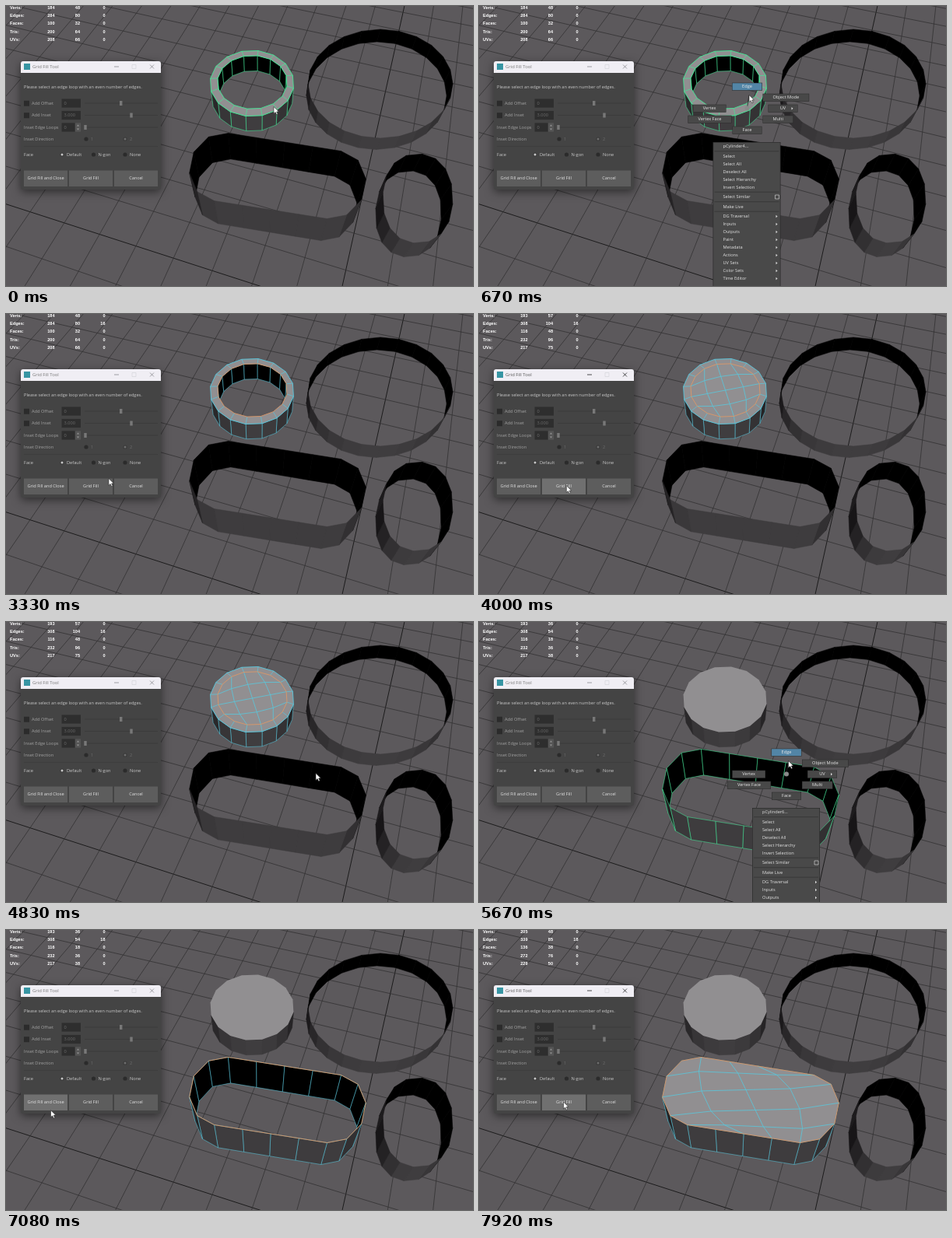
These frames come from a looping animation (600x360 px, 8 s). An HTML page with a canvas:

```html
<!DOCTYPE html>
<html lang="en">
<head>
<meta charset="utf-8">
<title>Grid Fill Tool</title>
<style>
html, body { margin: 0; width: 100%; height: 100%; overflow: hidden; background: #5c595c; }
canvas { display: block; }
</style>
</head>
<body>
<canvas id="stage" width="600" height="360"></canvas>
<script>
const ctx = document.getElementById('stage').getContext('2d');
const LOOP = 8000;
const GREEN = '#43e896', BLUE = '#58c8de', ORANGE = '#dc9868', FLOOR = '#5c595c';
const UI_FONT = '5.65px "Open Sans", sans-serif';

// ---------- timeline ----------
const T = {
  menu1: [80, 830], ringEdges: 920, ringPick: 1750, ringLoop: 1920, ringFill: 3750,
  select2: 5000, menu2: [5250, 6080], slotPick: 6330, slotLoop: 6500, slotFill: 7750
};
const within = (t, [a, b]) => t >= a && t < b;
const mix = (a, b, p) => a + (b - a) * p;
const mixPoint = (a, b, p) => [mix(a[0], b[0], p), mix(a[1], b[1], p)];

const menuCenter1 = [344.5, 131], menuCenter2 = [395, 195];
const edgeItem = ([x, y]) => [x + 2.5, y - 16.5];
const fillButton = [108.5, 221];
const cursorMoves = [
  { from: 300, to: 600, at: edgeItem(menuCenter1) },
  { from: 1170, to: 1420, at: [338, 127] },
  { from: 2000, to: 2500, at: [149, 204.5] },
  { from: 3170, to: 3530, at: fillButton },
  { from: 3950, to: 4700, at: [398, 194.5] },
  { from: 5300, to: 5640, at: edgeItem(menuCenter2) },
  { from: 6520, to: 6980, at: [57.5, 231.8] },
  { from: 7250, to: 7640, at: fillButton }
];
function cursorAt(t) {
  return cursorMoves.reduce((pos, { from, to, at }) => {
    const p = Math.min(1, Math.max(0, (t - from) / (to - from)));
    return mixPoint(pos, at, p * p * (3 - 2 * p));
  }, [344, 129.5]);
}

// ---------- drawing helpers ----------
function path(points, closed) {
  points.forEach(([x, y], i) => i ? ctx.lineTo(x, y) : ctx.moveTo(x, y));
  if (closed) ctx.closePath();
}
function fill(points, color) {
  ctx.beginPath(); path(points, true);
  ctx.fillStyle = color; ctx.fill();
}
function line(points, color, width = 0.8, closed = false) {
  ctx.beginPath(); path(points, closed);
  ctx.strokeStyle = color; ctx.lineWidth = width; ctx.stroke();
}
function rect(x, y, w, h, color) {
  ctx.fillStyle = color; ctx.fillRect(x, y, w, h);
}
function box(x, y, size, color) {
  ctx.strokeStyle = color; ctx.lineWidth = 0.7; ctx.strokeRect(x, y, size, size);
}
function dot(x, y, r, color) {
  ctx.beginPath(); ctx.arc(x, y, r, 0, 7);
  ctx.fillStyle = color; ctx.fill();
}
function text(str, x, y, color, align = 'left', font = UI_FONT) {
  ctx.font = font; ctx.textAlign = align; ctx.textBaseline = 'middle';
  ctx.fillStyle = color; ctx.fillText(str, x, y);
}

// ---------- scene geometry ----------
const NADIR = [325, 590], HORIZON = -650;
const range = n => Array.from({ length: n }, (_, i) => i);

// Ring of points; power below 1 makes it squarer.
function ellipse(cx, cy, rx, ry, n, phase = 0, power = 1) {
  const shape = v => Math.sign(v) * Math.abs(v) ** power;
  return range(n).map(k => {
    const a = phase + k * 2 * Math.PI / n;
    return [cx + rx * shape(Math.cos(a)), cy + ry * shape(Math.sin(a))];
  });
}
// Two five-sided caps joined by straight sides of four segments, clockwise.
function stadium(left, right, up, out) {
  const cap = (c, sign) => range(6).map(k => {
    const a = k * Math.PI / 5, u = sign * Math.cos(a), o = sign * Math.sin(a);
    return [c[0] + up[0] * u + out[0] * o, c[1] + up[1] * u + out[1] * o];
  });
  const side = (a, b) => [1, 2, 3].map(k => mixPoint(a, b, k / 4));
  const r = cap(right, 1), l = cap(left, -1);
  return [...r, ...side(r[5], l[0]), ...l, ...side(l[5], r[0])];
}
// Walls run down toward the vertical vanishing point.
function walls(rim, height) {
  const low = rim.map(p => mixPoint(p, NADIR, height * (p[1] - HORIZON)));
  return rim.map((p, i) => {
    const j = (i + 1) % rim.length, q = low[i];
    const dx = rim[j][0] - p[0], dy = rim[j][1] - p[1];
    const front = dx * (q[1] - p[1]) - dy * (q[0] - p[0]) < 0;
    const lum = Math.round(20 + 43 * Math.abs(dx) / Math.hypot(dx, dy));
    return { quad: [p, rim[j], low[j], q], front, color: front ? `rgb(${lum},${lum - 2},${lum})` : '#000' };
  });
}
// Inner lines of an m by n grid spanned over a closed loop (Coons patch).
function gridLines(loop, start, m, n) {
  const at = k => loop[(start + k) % loop.length];
  const point = (i, j) => [0, 1].map(c => {
    const u = i / m, v = j / n, f = k => at(k)[c];
    return mix(f(i), f(2 * m + n - i), v) + mix(f(2 * m + 2 * n - j), f(m + j), u)
      - mix(mix(f(0), f(m), u), mix(f(2 * m + n), f(m + n), u), v);
  });
  return [
    ...range(m - 1).map(i => range(n + 1).map(j => point(i + 1, j))),
    ...range(n - 1).map(j => range(m + 1).map(i => point(i, j + 1)))
  ];
}

const ringOuter = ellipse(316, 99.5, 54, 42.5, 16, 0.148);
const ringInner = ellipse(316.5, 98, 45, 34.5, 16, 0.148);
const ringWalls = walls(ringOuter, 5.4e-5), holeWalls = walls(ringInner, 5.2e-5);
const ringGrid = gridLines(ringInner, 1, 4, 4);
const slotRim = stadium([276.5, 207], [421.5, 230], [9, -43.5], [40, 6]);
const slotWalls = walls(slotRim, 9.6e-5);
const slotGrid = gridLines(slotRim, 13, 4, 5);
const bigWalls = walls(ellipse(481, 100, 93, 70, 24), 4.2e-5);
const ovalWalls = walls(ellipse(529, 247.5, 45, 57.5, 16, 0.1, 0.9), 6.5e-5);

function drawFloor() {
  rect(0, 0, 600, 360, FLOOR);
  const a = 0.0174, b = 0.053, A = [-2800, HORIZON], B = [656, HORIZON], O = [425, 392];
  const ground = (u, v) => [0, 1].map(c => (O[c] + u * a * A[c] + v * b * B[c]) / (1 + u * a + v * b));
  for (let k = -5; k <= 16; k++) {
    const color = k ? '#333133' : '#0c0c0c';
    line([ground(k, -5), ground(k, 16)], color);
    line([ground(-5, k), ground(16, k)], color);
  }
}
function drawWalls(list, front, wire) {
  for (const w of list) if (w.front === front) {
    fill(w.quad, w.color);
    line(w.quad, wire || w.color, 0.55, true);
  }
}
function drawTube(list, wire) {
  drawWalls(list, false, wire);
  drawWalls(list, true, wire);
}

function drawRing(t) {
  const filled = t >= T.ringFill, active = t < T.select2;
  const wire = !active ? null : t < T.ringEdges ? GREEN : BLUE;
  if (!filled) drawWalls(holeWalls, false, wire);
  drawWalls(ringWalls, true, wire);
  ctx.beginPath();
  path(ringOuter, true);
  if (!filled) path(ringInner, true);
  ctx.fillStyle = '#918f91'; ctx.fill('evenodd');
  if (!active) return;
  ringOuter.forEach((p, i) => line([p, ringInner[i]], wire, 0.7));
  if (filled) ringGrid.forEach(l => line(l, wire));
  line(ringOuter, wire, 0.9, true);
  line(ringInner, t >= T.ringLoop ? ORANGE : wire, 0.9, true);
  if (within(t, [T.ringPick, T.ringLoop])) line(ringInner.slice(2, 4), '#2be01a', 2);
}

function drawSlot(t) {
  const wire = t < T.select2 ? null : t < T.menu2[1] ? GREEN : BLUE;
  drawTube(slotWalls, wire);
  if (t >= T.slotFill) {
    fill(slotRim, '#918f91');
    slotGrid.forEach(l => line(l, BLUE));
  }
  if (t >= T.slotLoop) line(slotRim, ORANGE, 0.9, true);
  else if (t >= T.slotPick) line(slotRim.slice(16, 18), '#2be01a', 2);
}

// ---------- interface ----------
// Elements a filled grid adds: verts, edges, faces, tris, UVs.
function gridCounts(m, n) {
  const inner = (m - 1) * (n - 1);
  return [inner, m * (n - 1) + n * (m - 1), m * n, 2 * m * n, inner];
}
const add = (a, b, on) => a.map((v, i) => v + (on ? b[i] : 0));
function drawStats(t) {
  const ringAdd = gridCounts(4, 4), slotAdd = gridCounts(4, 5);
  const ringDone = t >= T.ringFill, slotDone = t >= T.slotFill;
  const total = add(add([184, 284, 100, 200, 208], ringAdd, ringDone), slotAdd, slotDone);
  const object = t < T.select2
    ? add([48, 80, 32, 64, 66], ringAdd, ringDone)
    : add([36, 54, 18, 36, 38], slotAdd, slotDone);
  const picked = t >= T.slotLoop ? 18 : t >= T.slotPick ? 1 : t >= T.select2 ? 0
    : t >= T.ringLoop ? 16 : t >= T.ringPick ? 1 : 0;
  const font = 'bold 5.6px "Liberation Sans", sans-serif';
  ['Verts:', 'Edges:', 'Faces:', 'Tris:', 'UVs:'].forEach((name, i) => {
    const y = 2.7 + i * 10.1;
    text(name, 5, y, '#fff', 'left', font);
    [total[i], object[i], i === 1 ? picked : 0].forEach((n, c) =>
      text(n, 62.5 + c * 32.5, y, '#fff', 'right', font));
  });
}

function drawSlider(y, handle) {
  line([[101, y], [195, y]], '#3b3b3b', 1);
  rect(handle - 1.7, y - 3, 3.4, 6, '#787878');
}
function drawField(y, value, width) {
  rect(71.5, y - 5.6, width, 11.2, '#2e2e2e');
  text(value, 74.5, y + 0.3, '#6c6c6c');
}
function drawRadio(x, y, label, on, color) {
  dot(x, y, 2.6, on ? '#3a3a3a' : '#2b2b2b');
  if (on) dot(x, y, 1.5, color);
  text(label, x + 6, y + 0.3, color);
}
function drawTitleBar(active) {
  const glyph = active ? '#222' : '#8a8a8e';
  ctx.beginPath(); ctx.roundRect(19, 71, 180, 15, [3, 3, 0, 0]);
  ctx.fillStyle = '#f0eef4'; ctx.fill();
  rect(23, 74, 8, 8, '#3795a3');
  text('Grid Fill Tool', 34, 78.6, active ? '#555' : '#777', 'left', '5.9px "Open Sans", sans-serif');
  line([[139, 78], [145, 78]], glyph);
  box(162, 75.5, 5, '#d6d6dc');
  line([[185, 75.5], [190, 80.5]], glyph);
  line([[190, 75.5], [185, 80.5]], glyph);
}
function drawDialog(t, [mx, my]) {
  const bright = '#c8c8c8', dim = '#a2a2a2', off = '#6c6c6c';
  ctx.save();
  ctx.shadowColor = 'rgba(0,0,0,.5)'; ctx.shadowBlur = 12; ctx.shadowOffsetY = 3;
  ctx.beginPath(); ctx.roundRect(19, 71, 180, 165, 3);
  ctx.fillStyle = '#444'; ctx.fill();
  ctx.restore();
  drawTitleBar(within(t, [3670, 4300]) || t >= 7670);
  text('Please select an edge loop with an even number of edges.', 23, 104.2, bright);

  const row = i => 125 + i * 15.5;
  [['Add Offset', '0', 147.7], ['Add Inset', '3.000', 161]].forEach(([label, value, handle], i) => {
    rect(23, row(i) - 3.3, 7, 7, '#2b2b2b');
    text(label, 33, row(i) + 0.3, dim);
    drawField(row(i), value, 24.5);
    drawSlider(row(i), handle);
  });
  text('Inset Edge Loops', 23, row(2) + 0.2, dim);
  drawField(row(2), '0', 17);
  rect(89, row(2) - 5.6, 7, 11.2, '#555');
  for (const s of [-1, 1]) fill([[91, row(2) + 1.5 * s], [94, row(2) + 1.5 * s], [92.5, row(2) + 3.5 * s]], '#999');
  drawSlider(row(2), 102);
  text('Inset Direction', 23, 171.2, dim);
  drawRadio(103, 171, '1', false, off);
  drawRadio(153, 171, '2', true, off);
  line([[23, 180.5], [195, 180.5]], '#3c3c3c');
  text('Face', 23, 191.3, bright);
  ['Default', 'N-gon', 'None'].forEach((label, i) => drawRadio(72 + i * 40.5, 191, label, !i, bright));
  ['Grid Fill and Close', 'Grid Fill', 'Cancel'].forEach((label, i) => {
    const x = 23 + i * 58, hover = within(mx, [x, x + 56]) && within(my, [211.5, 232.5]);
    rect(x, 211.5, 56, 20.5, hover ? '#707070' : '#5d5d5d');
    text(label, x + 28, 222, '#e6e6e6', 'center');
  });
}

// Marking menu, clockwise from the top; the last direction stays empty.
const DIRECTIONS = ['Edge', 'Object Mode', 'UV', 'Multi', 'Face', 'Vertex Face', 'Vertex'];
const ITEMS = ['-', 'Select', 'Select All', 'Deselect All', 'Select Hierarchy', 'Invert Selection', '-',
  'Select Similar', '-', 'Make Live', '-', 'DG Traversal>', 'Inputs>', 'Outputs>', 'Paint>', 'Metadata>',
  'Actions>', 'UV Sets>', 'Color Sets>', 'Time Editor>'];

function drawMenu([x, y], name, cursor) {
  const arrow = (ax, ay) => fill([[ax, ay - 1.8], [ax, ay + 1.8], [ax + 2, ay]], '#ddd');
  const hot = cursor[1] < y - 8;
  line([[x, y], cursor], '#222');
  dot(x, y + 0.5, 3, '#8a8a8a');
  DIRECTIONS.forEach((label, i) => {
    ctx.font = UI_FONT;
    const w = Math.max(38, ctx.measureText(label).width + 26);
    const level = i <= 4 ? i - 2 : 6 - i;
    const side = i % 4 ? (i < 4 ? 1 : -1) : 0;
    const cx = x + side * ((level ? 20 : 27) + w / 2), cy = y + 0.7 + level * 14;
    rect(cx - w / 2, cy - 5, w, 10, '#2b2b2b');
    rect(cx - w / 2 + 0.5, cy - 4.5, w - 1, 9, !i && hot ? '#5285a6' : '#484848');
    text(label, cx, cy + 0.3, '#e8e8e8', 'center');
    if (label === 'UV') arrow(cx + 11, cy);
  });

  const left = x - 44, width = 87;
  rect(left, y + 44, width, 360, '#2b2b2b');
  rect(left + 0.7, y + 44.7, width - 1.4, 360, '#494949');
  let rowY = y + 39.5;
  for (const item of [name, ...ITEMS]) {
    rowY += item === '-' ? 2.5 : 10;
    if (item === '-') {
      line([[left + 2, rowY + 3.7], [left + width - 2, rowY + 3.7]], '#343434');
      continue;
    }
    text(item.replace('>', ''), x - 31, rowY + 0.3, '#e4e4e4');
    if (item.endsWith('>')) arrow(x + 37, rowY);
    if (item === 'Select Similar') box(x + 36, rowY - 2.5, 5, '#ccc');
  }
}

function drawCursor([x, y]) {
  const shape = [[0, 0], [0, 9], [2.1, 7], [3.7, 10.3], [5.2, 9.6], [3.7, 6.5], [6.4, 6.3]]
    .map(([dx, dy]) => [x + dx, y + dy]);
  fill(shape, '#fff');
  line(shape, '#222', 0.6, true);
}

function draw(t) {
  const cursor = cursorAt(t);
  drawFloor();
  drawTube(bigWalls);
  drawTube(ovalWalls);
  drawRing(t);
  drawSlot(t);
  drawStats(t);
  drawDialog(t, cursor);
  if (within(t, T.menu1)) drawMenu(menuCenter1, 'pCylinder4...', cursor);
  if (within(t, T.menu2)) drawMenu(menuCenter2, 'pCylinder6...', cursor);
  drawCursor(cursor);
}

ctx.lineJoin = 'round';
const start = performance.now();
function tick() {
  draw((performance.now() - start) % LOOP);
  requestAnimationFrame(tick);
}
tick();
</script>
</body>
</html>
```
